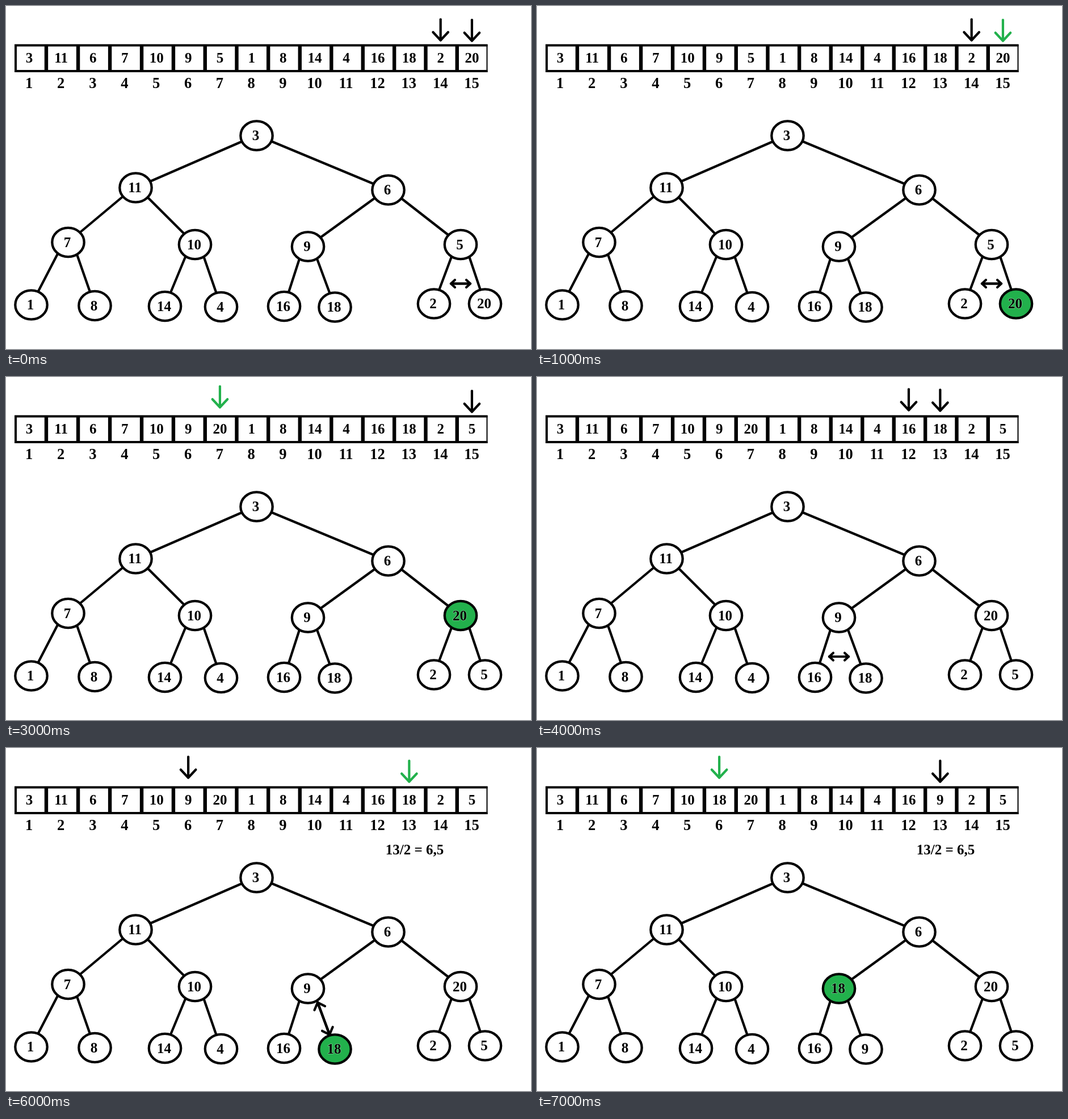
Write an HTML page with a canvas that moves like this. It is 925 by 606 pixels and loops after 8 s.

```html
<!DOCTYPE html>
<html lang="en">
<head>
<meta charset="utf-8">
<title>Building a heap</title>
<style>
html, body { margin: 0; width: 100%; height: 100%; overflow: hidden; background: #fff; }
canvas { display: block; }
</style>
</head>
<body>
<canvas id="stage" width="925" height="606"></canvas>
<script>
const ctx = document.getElementById('stage').getContext('2d');
const BLACK = '#000', GREEN = '#22b14c';
const STEP = 1000, STEPS_PER_ROUND = 4;

const startValues = [3, 11, 6, 7, 10, 9, 5, 1, 8, 14, 4, 16, 18, 2, 20];

// Each round lifts the larger child above its parent.
const rounds = [
  { child: 15, sumX: 823.5, keepSum: false },
  { child: 13, sumX: 720, keepSum: true }
];

// Hand-placed tree, root first, level by level
const nodes = [
  [441.5, 229],
  [228.5, 321], [673.5, 325],
  [109.5, 417.5], [333, 421.5], [532, 425], [801, 421.5],
  [44.5, 528], [156.5, 529.5], [280, 530.5], [379, 531.5],
  [490, 530.5], [579.5, 532], [754, 526], [844, 526]
].map(([x, y]) => ({ x, y }));

const parentOf = n => Math.floor(n / 2);
const nodeAt = n => nodes[n - 1];

// The slots narrow slightly towards the right.
const slotX = n => 41 + 56.2 * (n - 1) - 0.035 * (n - 1) ** 2;

// Endpoints of the part of a branch between two fractions of its length
function branch(n, from = 0, to = 1) {
  const parent = nodeAt(parentOf(n)), child = nodeAt(n);
  const depth = Math.floor(Math.log2(n));
  const x = parent.x + (n % 2 ? 1 : -1) * 2 ** depth;
  const point = t => [x + (child.x - x) * t, parent.y + (child.y - parent.y) * t];
  return [point(from), point(to)];
}

function polyline(points, color = BLACK) {
  ctx.beginPath();
  for (const [x, y] of points) ctx.lineTo(x, y);
  ctx.strokeStyle = color;
  ctx.lineWidth = 4.2;
  ctx.stroke();
}

function arrow(tail, tip, headSize, color) {
  const angle = Math.atan2(tail[1] - tip[1], tail[0] - tip[0]);
  const wing = turn => [
    tip[0] + headSize * Math.cos(angle + turn),
    tip[1] + headSize * Math.sin(angle + turn)
  ];
  polyline([tail, tip], color);
  polyline([wing(-0.75), tip, wing(0.75)], color);
}

function doubleArrow(a, b, headSize) {
  arrow(a, b, headSize);
  arrow(b, a, headSize);
}

function pointer(slot, color = BLACK) {
  const x = slotX(slot), y = 46.5 + slot;
  arrow([x, y - 37], [x, y], 19.5, color);
}

function label(text, x, y, size = 25, halo = false) {
  ctx.font = `bold ${size}px "Liberation Serif", "Times New Roman", serif`;
  ctx.textAlign = 'center';
  const baseline = y + size * 0.335;
  if (halo) {
    ctx.strokeStyle = 'rgba(255,255,255,0.4)';
    ctx.lineWidth = 1.6;
    ctx.strokeText(text, x, baseline);
  }
  ctx.fillStyle = BLACK;
  ctx.fillText(text, x, baseline);
}

function valuesAt(round, step) {
  const values = startValues.slice();
  rounds.forEach(({ child }, i) => {
    if (i > round || (i === round && step < 3)) return;
    const a = child - 1, b = parentOf(child) - 1;
    [values[a], values[b]] = [values[b], values[a]];
  });
  return values;
}

function drawArray(values) {
  ctx.fillStyle = BLACK;
  ctx.fillRect(15, 67.5, 833.5, 4);
  ctx.fillRect(15, 113, 833.5, 4);
  ctx.fillRect(15, 68, 4, 49);
  ctx.fillRect(846.5, 68, 2, 49);
  values.forEach((value, i) => {
    const x = slotX(i + 1);
    if (i > 0) ctx.fillRect(x - 29.4, 68, 6.4, 49);
    label(value, x, 92);
    label(i + 1, x - 0.5, 135.8, 26.5);
  });
}

function drawTree(values, activeNode) {
  for (let n = 2; n <= nodes.length; n++) polyline(branch(n));
  nodes.forEach(({ x, y }, i) => {
    const active = activeNode === i + 1;
    ctx.beginPath();
    ctx.ellipse(x, y, 28.2, 25.7, 0, 0, Math.PI * 2);
    ctx.fillStyle = active ? GREEN : '#fff';
    ctx.fill();
    ctx.strokeStyle = BLACK;
    ctx.lineWidth = 4.3;
    ctx.stroke();
    label(values[i], x - 1.4, y - 0.2, 25, active);
  });
}

function drawStep({ child, sumX, keepSum }, step) {
  const parent = parentOf(child);
  const swapped = step === 3;
  if (step < 2) {
    const { x, y } = nodeAt(parent);
    doubleArrow([x - 17, y + 69], [x + 17, y + 69], 9.5);
    pointer(child - 1);
    pointer(child, step ? GREEN : BLACK);
  } else {
    pointer(parent, swapped ? GREEN : BLACK);
    pointer(child, swapped ? BLACK : GREEN);
  }
  if (step === 2) doubleArrow(...branch(child, 0.23, 0.76), 14.5);
  if (step === 2 || (swapped && keepSum)) {
    label(`${child}/2 = ${String(child / 2).replace('.', ',')}`, sumX, 180);
  }
}

function draw(now) {
  const tickIndex = Math.floor(now / STEP) % (rounds.length * STEPS_PER_ROUND);
  const round = Math.floor(tickIndex / STEPS_PER_ROUND);
  const step = tickIndex % STEPS_PER_ROUND;
  const { child } = rounds[round];
  const activeNode = [0, child, child, parentOf(child)][step];
  const values = valuesAt(round, step);

  ctx.fillStyle = '#fff';
  ctx.fillRect(0, 0, 925, 606);
  ctx.lineCap = ctx.lineJoin = 'round';
  drawArray(values);
  drawTree(values, activeNode);
  drawStep(rounds[round], step);
}

const start = performance.now();
function tick() {
  draw(performance.now() - start);
  requestAnimationFrame(tick);
}
tick();
</script>
</body>
</html>
```
